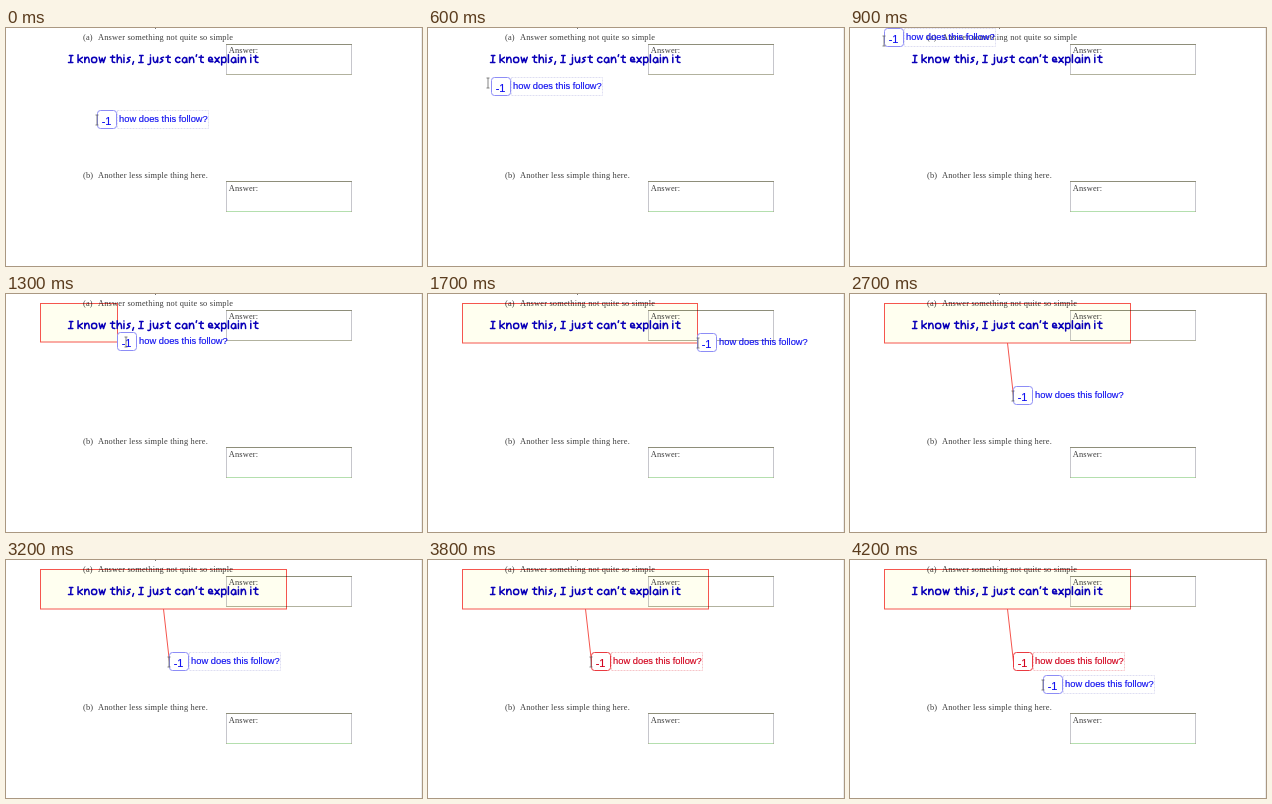
These frames come from a looping animation (416x238 px, 4.9 s). An HTML page:

```html
<!DOCTYPE html>
<html lang="en">
<head>
<meta charset="utf-8">
<title>Annotating an answer</title>
<style>
  html, body { margin: 0; width: 100%; height: 100%; overflow: hidden; background: #fff; }
  svg { display: block; width: 416px; height: 238px; }
  .print { font: 8.4px "Liberation Serif", "Times New Roman", serif; letter-spacing: .18px; fill: #3c3c3c; }
  #hand { fill: none; stroke: #0a00b8; stroke-width: 1.75; stroke-linecap: round; stroke-linejoin: round; }
  .side { stroke: #c6c6cc; }
  .top { stroke: #8e8e7a; }
  .base { stroke: #b2b29e; }
  .green { stroke: #b4dfae; }
  .note { --ink: #1010f0; --edge: #8d8df6; --dots: #dedef2; }
  .note.red { --ink: #d2001c; --edge: #ea3a40; --dots: #f6c4c8; }
  .note text { font-family: "Liberation Sans", Arial, sans-serif; fill: var(--ink); stroke: var(--ink); stroke-width: .15; }
  .mark { font-size: 11px; }
  .words { font-size: 9.35px; }
  .badge { fill: #fff; stroke: var(--edge); }
  .outline { fill: none; stroke: var(--dots); stroke-dasharray: 2 1; }
  #area { fill: #fffff0; stroke: #f5564e; mix-blend-mode: multiply; }
  #link { stroke: #f5564e; }
  #caret { fill: none; stroke: #666; stroke-width: .8; }
</style>
</head>
<body>
<svg viewBox="0 0 416 238">
  <path d="M415.5 0V238" stroke="#ececec"/>
  <path d="M149.5 0V1" stroke="#777"/>
  <g class="print">
    <text x="77" y="12">(a)</text>
    <text x="92" y="12">Answer something not quite so simple</text>
    <text x="77" y="150">(b)</text>
    <text x="92" y="150">Another less simple thing here.</text>
    <text x="222.7" y="25">Answer:</text>
    <text x="222.7" y="162.5">Answer:</text>
  </g>
  <g id="box">
    <path class="side" d="M220.5 16V47M345.5 16V47"/>
    <path class="base" d="M220 46.5H346"/>
    <path class="top" d="M220 16.5H346"/>
  </g>
  <use href="#box" y="137"/>
  <path class="green" d="M221 183.5H345"/>
  <rect id="area"/>
  <path id="link"/>
  <g id="hand" role="img" aria-label="I know this, I just can't explain it"></g>
  <g id="first" class="note">
    <rect class="outline" x="20.5" y="-9.5" width="91" height="18"/>
    <rect class="badge" x=".5" y="-9.5" width="19" height="18" rx="3"/>
    <text class="mark" x="4.7" y="4.5">-1</text>
    <text class="words" x="22" y="2">how does this follow?</text>
  </g>
  <path id="caret" d="M-1.5-5H1.5M0-5V5M-1.5 5H1.5"/>
</svg>
<script>
const LOOP = 4900, STEP = 100, LEAD = 17;
const AREA = { x: 34.5, y: 9.5, right: 280.5, bottom: 49 };

const smooth = p => p * p * (3 - 2 * p);
const late = p => p ** 2.4;
const early = p => 1 - (1 - p) ** 3;
const sag = p => smooth(p) ** 1.3;

// each move starts where the one before it ended
const drag = {
  x: 91, y: 92,
  moves: [
    { start: 300, end: 900, x: 34, y: 10, easeX: smooth, easeY: sag },
    { start: 900, end: 1500, x: 239, y: 49, easeX: late, easeY: early },
    { start: 1500, end: 2100, x: 281, y: 49, easeX: early, easeY: early },
    { start: 2200, end: 2700, x: 163, y: 102, easeX: smooth, easeY: smooth }
  ]
};
const copyDrag = {
  x: 163, y: 102,
  moves: [{ start: 3900, end: 4200, x: 193, y: 125, easeX: smooth, easeY: smooth }]
};

// pen strokes shared by the letters, on a baseline of 0
const stem = 'M0-6V0', tall = 'M0-9V0', dot = 'M0-8.5V-8.6', arch = 'M0-2Q1-6 3-6T5 0';
const bowl = 'M5-5Q2-7 .5-4T2 0T5-5';
const letters = {
  I: [5, 'M1-8H5M3-8L2.5 0M0 0H5'],
  k: [5, tall + 'M5-6L1-3L5 0'],
  n: [5, stem + arch],
  h: [5, tall + arch],
  o: [6, 'M3-6Q0-6 0-3T3 0T6-3T3-6'],
  w: [7, 'M0-6L1.5 0L3.5-5L5 0L7-6'],
  t: [5, 'M2.5-8L2-2Q2 0 5 0M0-6H5'],
  i: [.5, stem + dot],
  l: [.5, tall],
  s: [4, 'M4-6Q-1-5 2-3.5T0 0'],
  j: [.5, 'M0-6V0Q0 3-3 2' + dot],
  u: [5, 'M0-6Q0 0 2 0T5-5M5-6V0'],
  c: [5, 'M5-5Q3-7 1-5T1-1T5-1'],
  a: [5.5, bowl + 'L5.5 0'],
  e: [4.5, 'M0-3H4.5Q4-6 2-6T0-3T5-1'],
  x: [5, 'M0-6L5 0M5-6L0 0'],
  p: [5, 'M0-6V3M0-5Q5-8 5-3T0-1'],
  ',': [1, 'M1-1L0 2'],
  '’': [.5, 'M.5-9L0-7']
};

const $ = id => document.getElementById(id);
const set = (el, attrs) => { for (const k in attrs) el.setAttribute(k, attrs[k]); };
const show = (el, on) => { el.style.display = on ? '' : 'none'; };
const moveTo = (el, { x, y }) => set(el, { transform: `translate(${x} ${y})` });

function handwrite(line, x, y, size) {
  for (const char of line) {
    if (char === ' ') { x += 2.8; continue; }
    const [width, d] = letters[char];
    if (char === 'j') x += 2.2;
    const stroke = document.createElementNS('http://www.w3.org/2000/svg', 'path');
    set(stroke, { d, transform: `translate(${x} ${y}) scale(${size})` });
    $('hand').append(stroke);
    x += width * size + 2.4;
  }
}

function poseAt(path, t) {
  let { x, y } = path;
  for (const m of path.moves) {
    const p = Math.min(1, Math.max(0, (t - m.start) / (m.end - m.start)));
    x += (m.x - x) * m.easeX(p);
    y += (m.y - y) * m.easeY(p);
  }
  return { x: Math.round(x), y: Math.round(y) };
}

const first = $('first'), area = $('area');
const copy = first.cloneNode(true);
copy.id = 'copy';
first.after(copy);
const outline = first.querySelector('.outline');

function draw(t) {
  const note = poseAt(drag, t);
  moveTo(first, note);
  first.classList.toggle('red', t >= 3600);
  show(outline, t < 1000 || t >= 3200);

  const placed = t >= 2300;
  const right = placed ? AREA.right : note.x + .5;
  const bottom = placed ? AREA.bottom : note.y;
  show(area, t >= 1000);
  set(area, {
    x: AREA.x, y: AREA.y,
    width: Math.max(0, right - AREA.x), height: Math.max(0, bottom - AREA.y)
  });
  show($('link'), placed);
  set($('link'), { d: `M${(AREA.x + AREA.right) / 2} ${AREA.bottom}L${note.x + .5} ${note.y}` });

  const copied = t >= 4000;
  show(copy, copied);
  moveTo(copy, poseAt(copyDrag, t));
  // the pointer runs slightly ahead of the note it drags
  moveTo($('caret'), poseAt(copied ? copyDrag : drag, t + LEAD));
}

function tick() {
  const t = performance.now() % LOOP;
  draw(Math.floor(t / STEP) * STEP);
  requestAnimationFrame(tick);
}

handwrite('I know this, I just can’t explain it', 62.5, 34.5, .87);
tick();
</script>
</body>
</html>
```
